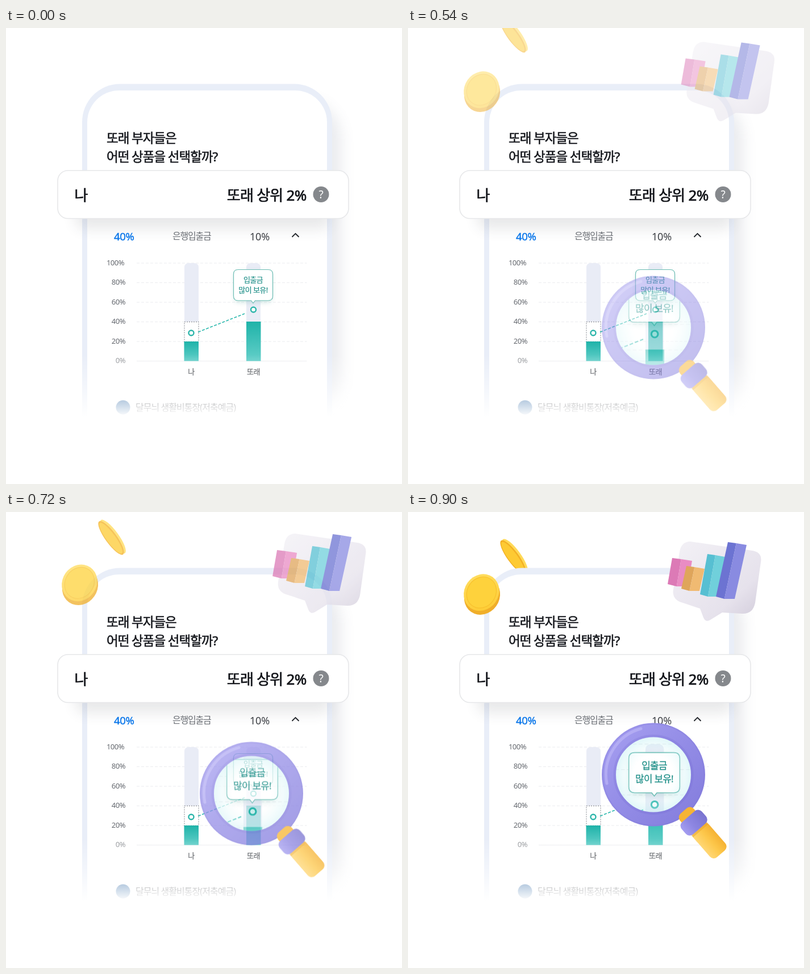
An HTML page that plays this animation: 697x803 px, repeating every 0.99 s.

```html
<!DOCTYPE html>
<html lang="ko">
<head>
<meta charset="utf-8">
<title>Chart promo</title>
<style>
  html, body { margin: 0; width: 100%; height: 100%; overflow: hidden; background: #fff; }
  svg { display: block; width: 697px; height: 803px; }
  text { font-family: "Noto Sans", "Noto Sans CJK KR", "Noto Sans CJK", sans-serif; }
  .title { font-size: 22.5px; font-weight: 500; letter-spacing: -1.05px; fill: #15171c; stroke: #15171c; stroke-width: .55px; }
  .big { font-size: 26px; font-weight: 500; letter-spacing: -.75px; fill: #111318; stroke: #111318; stroke-width: .65px; }
  .axis { font-size: 13px; letter-spacing: -.5px; fill: #666a70; }
  .cat { font-size: 13px; letter-spacing: -.5px; fill: #44484e; stroke: #44484e; stroke-width: .25px; text-anchor: middle; }
  .tip { font-size: 13px; letter-spacing: -.55px; fill: #23918a; stroke: #23918a; stroke-width: .2px; text-anchor: middle; }
</style>
</head>
<body>
<svg viewBox="0 0 697 803" xmlns="http://www.w3.org/2000/svg">
  <defs>
    <linearGradient id="fade" x1="0" y1="575" x2="0" y2="685" gradientUnits="userSpaceOnUse">
      <stop offset="0" stop-color="#fff" stop-opacity="0"/>
      <stop offset=".5" stop-color="#fff" stop-opacity=".45"/>
      <stop offset="1" stop-color="#fff"/>
    </linearGradient>
    <linearGradient id="teal" x1="0" y1="0" x2="0" y2="1">
      <stop offset="0" stop-color="#1fb3a9"/><stop offset="1" stop-color="#63cfc9"/>
    </linearGradient>
    <linearGradient id="ring" x1="0" y1="0" x2="1" y2="1">
      <stop offset="0" stop-color="#a59ef0"/><stop offset=".5" stop-color="#938ce6"/><stop offset="1" stop-color="#847ddd"/>
    </linearGradient>
    <linearGradient id="collar" x1="0" y1="0" x2="0" y2="1">
      <stop offset="0" stop-color="#7a74d0"/><stop offset=".6" stop-color="#8d86e2"/><stop offset="1" stop-color="#a49df0"/>
    </linearGradient>
    <linearGradient id="grip" x1="0" y1="0" x2="0" y2="1">
      <stop offset="0" stop-color="#f5b233"/><stop offset=".5" stop-color="#fdc84c"/><stop offset="1" stop-color="#ffd775"/>
    </linearGradient>
    <linearGradient id="gold" x1="0" y1="0" x2="1" y2="1">
      <stop offset="0" stop-color="#ffe066"/><stop offset="1" stop-color="#fdc92e"/>
    </linearGradient>
    <linearGradient id="bubble" x1="0" y1="0" x2="1" y2="1">
      <stop offset="0" stop-color="#f3f1f6"/><stop offset=".7" stop-color="#e6e2ec"/><stop offset="1" stop-color="#d0cad9"/>
    </linearGradient>
    <radialGradient id="glass">
      <stop offset=".5" stop-color="#d5f6f8" stop-opacity="0"/><stop offset="1" stop-color="#bfeef2" stop-opacity=".5"/>
    </radialGradient>
    <filter id="blur4" x="-30%" y="-30%" width="160%" height="160%"><feGaussianBlur stdDeviation="4"/></filter>
    <filter id="blur12" x="-20%" y="-60%" width="140%" height="220%"><feGaussianBlur stdDeviation="12"/></filter>
    <clipPath id="hole"><circle cx="432" cy="462.5" r="67"/></clipPath>
  </defs>

  <g id="coinBack">
    <g transform="translate(187 78) rotate(54)">
      <ellipse cy="-1.5" rx="36" ry="10" fill="#ffda58"/>
      <ellipse cy="2.5" rx="36" ry="10" fill="#f3b024"/>
      <ellipse cy="3" rx="33" ry="8" fill="#fdca33"/>
    </g>
  </g>

  <rect x="190" y="125" width="400" height="560" rx="70" fill="#59627a" opacity=".12" filter="url(#blur12)"/>
  <rect x="134" y="98.5" width="440" height="660" rx="67" fill="#e9eef8"/>
  <rect x="143" y="110" width="422" height="660" rx="56" fill="#fff"/>

  <text class="title" x="177" y="202">또래 부자들은</text>
  <text class="title" x="177" y="235">어떤 상품을 선택할까?</text>

  <rect x="122" y="290" width="450" height="64" rx="18" fill="#33373f" opacity=".11" filter="url(#blur12)"/>

  <text x="190" y="373.5" font-size="18.5" font-weight="500" letter-spacing="-.3" fill="#0d78ea" stroke="#0d78ea" stroke-width=".45">40%</text>
  <text x="293" y="372" font-size="16" letter-spacing="-1.2" fill="#686c72">은행입출금</text>
  <text x="429" y="373.5" font-size="18" letter-spacing="-.2" fill="#3a3d42">10%</text>
  <path d="M503.5 368 509.5 362 515.5 368" fill="none" stroke="#22252a" stroke-width="1.9"/>

  <g id="axis"></g>

  <g id="chart">
    <g id="grid" stroke="#ebecef" stroke-width="1"></g>
    <path d="M314 517V422q0-8 8-8h9q8 0 8 8v95z" fill="#e9ecf6"/>
    <rect x="314" y="517.5" width="25" height="35" fill="#fff" stroke="#9a9da3" stroke-width="1.3" stroke-dasharray="2 2"/>
    <rect x="313.5" y="552" width="25.5" height="34.5" fill="url(#teal)"/>
    <path d="M423 517V422q0-8 8-8h9q8 0 8 8v95z" fill="#e9ecf6"/>
    <rect x="423" y="517" width="25.5" height="69.5" fill="url(#teal)"/>
    <path d="M338 535.5 420 503" stroke="#2bb8ad" stroke-width="1.6" stroke-dasharray="5 2.6"/>
    <g fill="#fff" stroke="#2bb5aa" stroke-width="2.4">
      <circle cx="326" cy="537" r="4.5"/><circle cx="435.5" cy="496" r="4.5"/>
    </g>
    <rect x="402" y="429" width="66" height="54" rx="8" fill="#2a8f86" opacity=".22" filter="url(#blur4)"/>
    <path d="M408.5 425.5h53q8 0 8 8v38.5q0 8-8 8h-23l-3.5 4.5-3.5-4.5h-23q-8 0-8-8v-38.5q0-8 8-8z" fill="#fff" stroke="#6dbdb4" stroke-width="1.2"/>
    <text class="tip" x="435" y="448">입출금</text>
    <text class="tip" x="435" y="466">많이 보유!</text>
  </g>
  <text class="cat" x="326" y="609.5">나</text>
  <text class="cat" x="435.5" y="609.5">또래</text>

  <circle cx="206" cy="668" r="12.5" fill="#0b4f96"/>
  <text x="228" y="674" font-size="16" letter-spacing="-.95" fill="#22252a">달무늬 생활비통장(저축예금)</text>
  <rect x="0" y="575" width="697" height="228" fill="url(#fade)"/>

  <rect x="91" y="251" width="512" height="84.5" rx="18" fill="#fff" stroke="#e6e7e9" stroke-width="1.6"/>
  <text class="big" x="120.5" y="304">나</text>
  <text class="big" x="528.5" y="304" text-anchor="end">또래 상위 2%</text>
  <circle cx="554.5" cy="293" r="14" fill="#85888c"/>
  <text x="554.5" y="300" font-size="19" font-weight="500" fill="#fff" text-anchor="middle">?</text>

  <g id="coinFront">
    <g transform="translate(129.5 145.5) rotate(35)">
      <ellipse cx="2.2" cy="1.5" rx="30.5" ry="34" fill="#f0ae2a"/>
      <ellipse cx="-2.3" cy="-3" rx="30" ry="33.5" fill="url(#gold)"/>
      <ellipse cx="-2.3" cy="-3" rx="25" ry="28.5" fill="#fed23c" stroke="#f8c12c" stroke-width="1.2"/>
    </g>
  </g>

  <g id="bars">
    <path d="M497 52 606 68Q624 71 621 88L611 160Q607 180 588 179L553 177 532 190Q524 195 520 186L514 170 484 160Q464 155 467 136L478 70Q481 52 497 52Z" fill="url(#bubble)"/>
  </g>

  <g id="lens">
    <g clip-path="url(#hole)">
      <circle cx="432" cy="462.5" r="68" fill="#fff"/>
      <use id="zoom" href="#chart"/>
      <circle cx="432" cy="462.5" r="68" fill="url(#glass)"/>
    </g>
    <g fill="none">
      <circle cx="432" cy="462.5" r="78.5" stroke="url(#ring)" stroke-width="25"/>
      <circle cx="432" cy="462.5" r="68.5" stroke="#6d66cc" stroke-width="4" opacity=".22"/>
      <circle cx="432" cy="462.5" r="89.5" stroke="#7f79d6" stroke-width="2.5" opacity=".25"/>
      <path d="M350 478A83.5 83.5 0 0 1 410 381.5" stroke="#c0baf8" stroke-width="5" stroke-linecap="round" opacity=".6"/>
    </g>
    <g transform="translate(503.5 547.5) rotate(49)">
      <rect x="-28" y="-16" width="22" height="32" rx="9" fill="#f6b433"/>
      <rect x="10" y="-18" width="62" height="36" rx="9" fill="url(#grip)"/>
      <rect x="10" y="-18" width="8" height="36" fill="#e79f24" opacity=".45"/>
      <rect x="-15" y="-23.5" width="29" height="47" rx="9" fill="url(#collar)"/>
    </g>
  </g>
</svg>
<script>
const LOOP = 990, STEP = 30, STEPS = 24;
const $ = id => document.getElementById(id);

function add(parent, tag, attrs, text) {
  const el = document.createElementNS("http://www.w3.org/2000/svg", tag);
  for (const k in attrs) el.setAttribute(k, attrs[k]);
  if (text) el.textContent = text;
  parent.append(el);
}

for (let i = 0; i < 6; i++) {
  const y = 414 + i * 34.5;
  add($("axis"), "text", { class: "axis", x: i ? 210 : 208, y: y + 3.5, "text-anchor": "end",
    opacity: i == 5 ? .7 : 1 }, 100 - i * 20 + "%");
  add($("grid"), "path", { d: `M230 ${y}H529.5`, "stroke-dasharray": i == 5 ? "none" : "5 3" });
}

// two-sided column from its top-left and bottom-left corners
function prism(x, y, bx, by, w, dark, light) {
  const m = w * .45;
  add($("bars"), "path", { fill: dark, d: `M${x} ${y}l${m} 2L${bx + m} ${by + 4} ${bx} ${by}z` });
  add($("bars"), "path", { fill: light, d: `M${x + m} ${y + 2}L${x + w} ${y + 5} ${bx + w} ${by + 4} ${bx + m} ${by + 4}z` });
}
prism(465, 81, 457, 127, 35, "#dc7ab6", "#e98cc3");
prism(490, 95, 481, 135, 32, "#dfa55b", "#f0ba72");
prism(527, 74, 514, 145, 31, "#57bfd2", "#70d0db");
prism(563, 53, 542, 149, 33, "#6c73d2", "#898be1");

function place(id, x, y, alpha) {
  $(id).setAttribute("transform", `translate(${x} ${y})`);
  $(id).setAttribute("opacity", alpha);
}

function draw(t) {
  const k = Math.floor((t - 180) / STEP + .01);
  const p = Math.min(STEPS, Math.max(0, k)) / STEPS;
  const r = 1 - Math.pow(p, 1.15);
  place("coinBack", 0, -120 * r, p);
  place("coinFront", 0, -60 * r, p);
  place("bars", 43 * r, -50 * r, p);
  place("lens", 0, 118 * r, p);
  // magnified chart drifts slower than the lens itself
  $("zoom").setAttribute("transform", `translate(433.5 ${423 - 75 * r}) scale(1.3) translate(-435 -425)`);
}

function tick() {
  draw(performance.now() % LOOP);
  requestAnimationFrame(tick);
}
tick();
</script>
</body>
</html>
```
